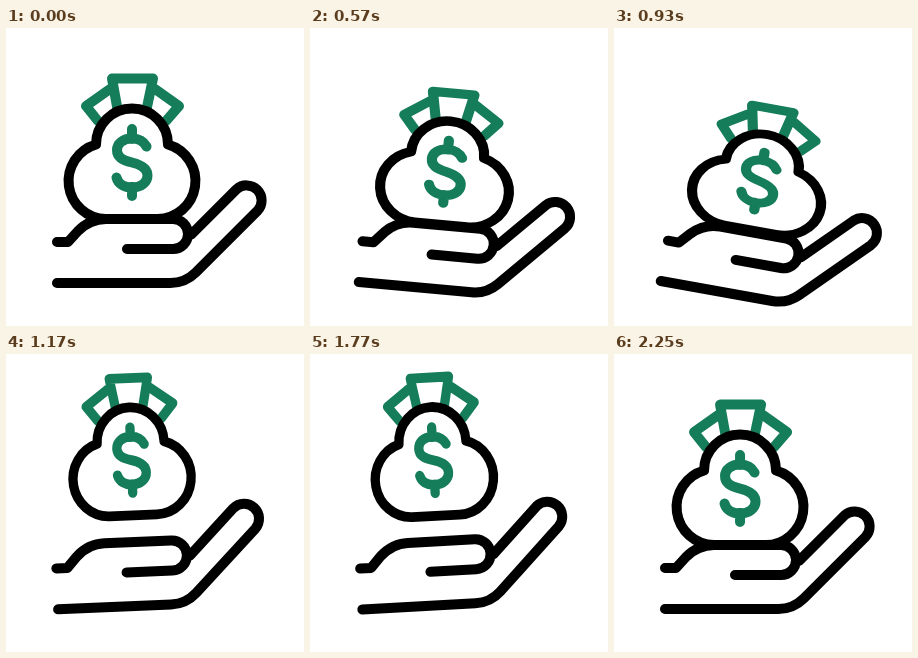
An HTML page with a canvas that plays this animation: 298x298 px, repeating every 2580 ms.

```html
<!DOCTYPE html>
<html lang="en">
<head>
<meta charset="utf-8">
<title>Hand tossing a money bag</title>
<style>
html, body { margin: 0; width: 100%; height: 100%; overflow: hidden; background: #fff; }
canvas { display: block; width: 100vw; height: 100vh; }
</style>
</head>
<body>
<canvas id="stage"></canvas>
<script>
const SIZE = 298, LOOP = 2580, STEP = 30;
const BLACK = '#000', GREEN = '#157d5a';
const PIVOT = { x: 60, y: 230 };
const BASE = { x: 126, y: 191 };

const canvas = document.getElementById('stage');
const ctx = canvas.getContext('2d');
const ratio = window.devicePixelRatio || 1;
canvas.width = canvas.height = Math.round(SIZE * ratio);

const hand = new Path2D(
  'M51 214H62L72 203C80 195 88 191 100 191H167A15 15 0 0 1 167 221H121' +
  'M185 206.8L230.4 161.4A15 15 0 0 1 251.6 182.6L189.7 244.5A36 36 0 0 1 164.2 255H51');
const bag = new Path2D(
  'M90 116.5A36 36 0 1 1 162 116.5A38 38 0 0 1 151 191H100A38 38 0 0 1 90 116.5Z');
const bills = new Path2D(
  'M112 84L106 50.5H147L140 84M104 61L80 78L92 93M149 61L173 78L160 93');
const dollar = new Path2D(
  'M126 101V111M126 159V168' +
  'M140.5 118.5C137.5 113 133 110.5 126 110.5C117 110.5 111 115.5 111 122' +
  'C111 129 116 132 126 134.5C136 137 141.5 140.5 141.5 147.5' +
  'C141.5 154.5 135 159.5 126 159.5C118 159.5 112 155.5 110.5 149.5');

// The bag rides in the tilted frame of the hand
const rest = { tilt: 0, lift: 0, slide: 0, wide: 1, tall: 1 };
const low = { tilt: 12, lift: 1.5, slide: 4.5, wide: 1.04, tall: 0.86 };
const high = { tilt: -5.3, lift: 32, slide: 4.5, wide: 0.91, tall: 1 };
const caught = { tilt: 5.5, lift: 0, slide: 2, wide: 1.02, tall: 0.93 };

const smooth = t => t * t * (3 - 2 * t);
const fall = t => t ** 3.6;

function bezier(x1, y1, x2, y2) {
  const curve = (a, b, u) => 3 * a * u * (1 - u) ** 2 + 3 * b * u * u * (1 - u) + u ** 3;
  return t => {
    let lo = 0, hi = 1;
    for (let i = 0; i < 24; i++) {
      const mid = (lo + hi) / 2;
      if (curve(x1, x2, mid) < t) lo = mid; else hi = mid;
    }
    return curve(y1, y2, lo);
  };
}
const toss = bezier(0.25, 0.1, 0.3, 1);
const launch = bezier(0.45, 0, 0.2, 1);

const moves = [
  { from: rest, to: low, start: 320, end: 870, ease: smooth },
  { from: low, to: high, start: 870, end: 1410, ease: toss, liftEase: launch },
  { from: high, to: caught, start: 1410, end: 1970, ease: fall },
  { from: caught, to: rest, start: 1970, end: 2260, ease: smooth }
];

function poseAt(t) {
  const move = moves.find(m => t >= m.start && t < m.end);
  if (!move) return rest;
  const { from, to, start, end, ease, liftEase = ease } = move;
  const u = (t - start) / (end - start);
  const pose = {};
  for (const key in from) {
    const p = (key === 'lift' ? liftEase : ease)(u);
    pose[key] = from[key] + (to[key] - from[key]) * p;
  }
  return pose;
}

function stroke(path, color) {
  ctx.strokeStyle = color;
  ctx.stroke(path);
}

function draw(t) {
  const { tilt, lift, slide, wide, tall } = poseAt(t);
  ctx.setTransform(ratio, 0, 0, ratio, 0, 0);
  ctx.fillStyle = '#fff';
  ctx.fillRect(0, 0, SIZE, SIZE);
  ctx.lineCap = ctx.lineJoin = 'round';
  ctx.lineWidth = 10;

  ctx.translate(PIVOT.x, PIVOT.y);
  ctx.rotate(tilt * Math.PI / 180);
  ctx.translate(-PIVOT.x, -PIVOT.y);
  stroke(hand, BLACK);

  ctx.translate(BASE.x + slide, BASE.y - lift);
  ctx.scale(wide, tall);
  ctx.translate(-BASE.x, -BASE.y);
  stroke(bills, GREEN);
  ctx.fill(bag);
  stroke(bag, BLACK);
  stroke(dollar, GREEN);
}

const begin = performance.now();
function tick() {
  const t = (performance.now() - begin) % LOOP;
  draw(Math.floor(t / STEP) * STEP);
  requestAnimationFrame(tick);
}
tick();
</script>
</body>
</html>
```
